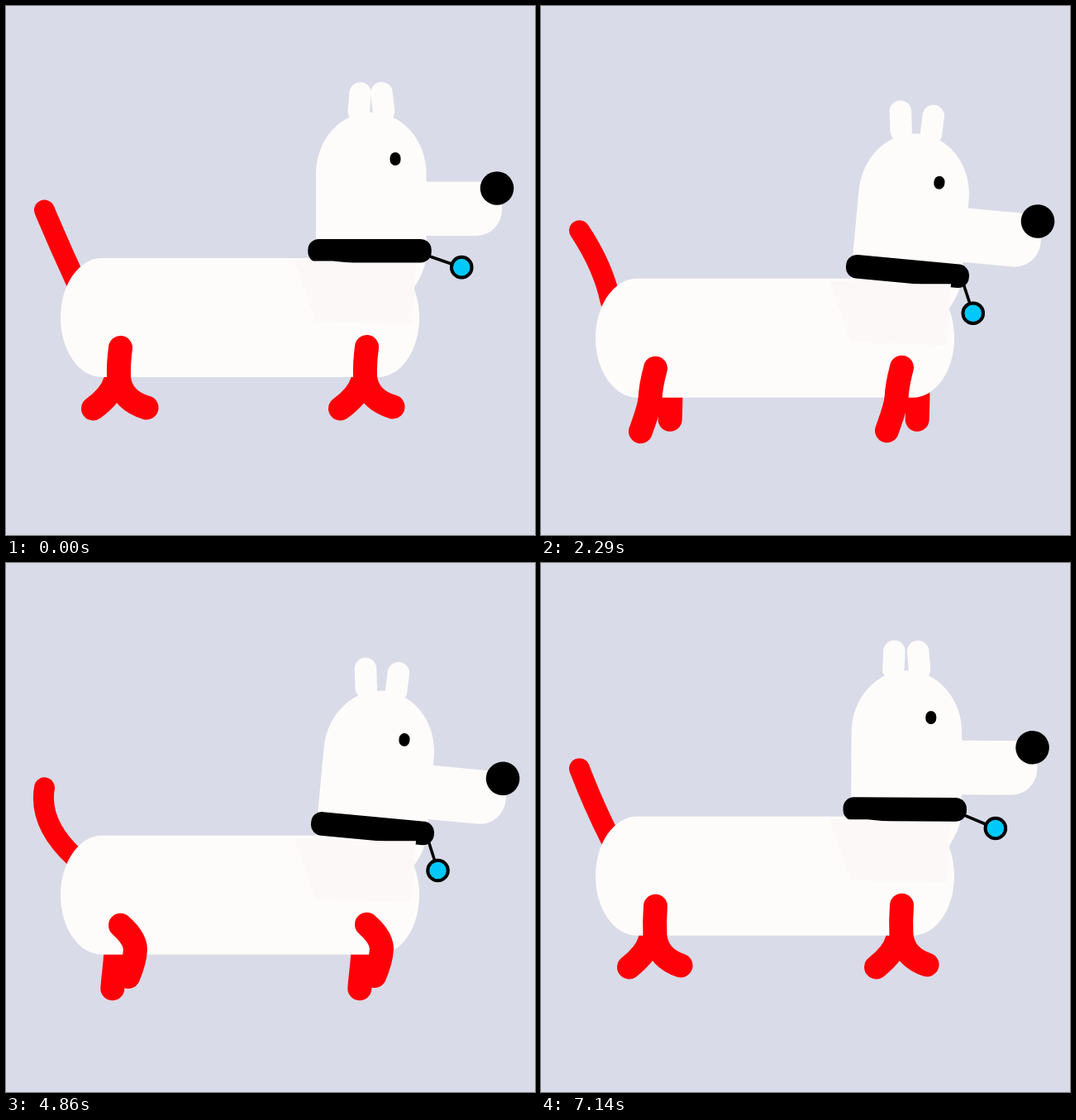
Write an HTML page that moves like this. It is 640 by 640 pixels and loops after 7.21 s.

```html
<!DOCTYPE html>
<html lang="en">
<head>
<meta charset="utf-8">
<title>Walking dog</title>
<style>
  html, body { margin: 0; width: 100%; height: 100%; overflow: hidden; background: #d9dbe8; }
  svg { display: block; width: 100%; height: 100%; }
  .white { fill: #fdfcfa; }
  .limb { fill: none; stroke: #ff0008; stroke-width: 29; stroke-linecap: round; stroke-linejoin: round; }
  .ear { stroke: #fdfcfa; stroke-width: 26.5; stroke-linecap: round; }
</style>
</head>
<body>
<svg viewBox="0 0 640 640">
  <g id="dog">
    <path id="tail" class="limb" style="stroke-width:25"/>
    <path class="limb far"/>
    <path class="limb far" transform="translate(299 0)"/>
    <g id="head">
      <line id="earL" class="ear"/>
      <line id="earR" class="ear"/>
      <path class="white" d="M375 320V203A66.75 74.5 0 0 1 508.5 203V305Q506 322 493 342L485 352H400Z"/>
      <path class="white" d="M490 212.5H600V246A31 32 0 0 1 569 278H490Z"/>
      <circle cx="594" cy="220.5" r="20.3"/>
      <rect id="eye" x="464.5" y="177" width="13" height="16" rx="6.5" ry="7"/>
    </g>
    <rect class="white" x="66" y="305" width="434" height="144" rx="50" ry="72"/>
    <g id="tag" stroke="#000">
      <line id="string" stroke-width="3.6"/>
      <circle id="bead" r="12.3" fill="#00c8fa" stroke-width="4"/>
    </g>
    <rect id="collar" x="365.3" y="282" width="149.4" height="28.6" rx="13"/>
    <path fill="#fcf8f7" d="M349 308.5H395L425 311.5H496L493.5 342L494 360L489 385.5L375 382Z"/>
    <path class="limb near"/>
    <path class="limb near" transform="translate(298 -1)"/>
  </g>
</svg>
<script>
const LOOP = 7210, STEPS = 101, STRIDE = 1791.7;
const LOW = 0.48;                       // point in a bounce where the body is lowest
const KEYS = [0, 0.24, 0.5, 0.74, 1];   // stride phases of the poses below

// Two cubic segments from the hip: controls, knee, controls, foot.
const LEG = [
  [137, 425, 136, 436, 136.5, 449, 138, 470, 153, 481, 170, 486],
  [135, 425, 132, 438, 132, 450, 131, 463, 126, 477, 122.8, 490.5],
  [137.5, 427, 136, 440, 132.5, 453, 129, 466, 118, 478, 105.5, 487],
  [148, 420, 159, 429, 160, 441, 160, 452, 157, 464, 154, 474]
];
const TAIL = [[65], [72], [59.5], [51]];

const $ = id => document.getElementById(id);
const mix = (a, b, k) => a + (b - a) * k;
const set = (el, attrs) => { for (const k in attrs) el.setAttribute(k, attrs[k]); };

function pose(keys, phase) {
  const p = phase % 1;
  const i = KEYS.findIndex((k, n) => p >= k && p < KEYS[n + 1]);
  const k = (p - KEYS[i]) / (KEYS[i + 1] - KEYS[i]);
  return keys[i].map((v, n) => mix(v, keys[(i + 1) % 4][n], k));
}

function drawLegs(selector, phase) {
  const d = 'M138.5 413.5C' + pose(LEG, phase).join(' ');
  document.querySelectorAll(selector).forEach(leg => set(leg, { d }));
}

function draw(t) {
  const phase = t / STRIDE;
  const bounce = phase * 2 % 1;
  const drop = bounce < LOW ? bounce / LOW : (1 - bounce) / (1 - LOW);
  const tilt = 6.2 * drop;

  set($('dog'), { transform: `translate(0 ${28.5 * drop})` });
  set($('head'), { transform: `rotate(${tilt} 434 303)` });
  set($('collar'), { transform: `rotate(${tilt} 441 333)` });

  drawLegs('.near', phase);
  drawLegs('.far', phase + 0.5);

  const [bend] = pose(TAIL, phase);
  set($('tail'), { d: `M46.5 247Q${2 * bend - 65.25} 290.5 84 332` });

  const flop = drop ** 0.6;
  set($('earL'), { x1: mix(428.7, 415, flop), y1: mix(105.5, 103.5, flop), x2: mix(426.7, 418.5, flop), y2: 127 });
  set($('earR'), { x1: mix(454.5, 456.5, flop), y1: 105.2, x2: mix(457, 455.6, flop), y2: 127 });

  // One short glance forward near the end of the walk
  const glance = Math.max(0, Math.min(1, (t - 5600) / 300, (6900 - t) / 300));
  set($('eye'), { transform: `translate(${4.5 * glance} 0)` });

  const angle = (19 + 61 * drop) * Math.PI / 180, reach = 42 - 7 * drop;
  const x = 511.5, y = 302.5 + 12 * drop;
  const bx = x + reach * Math.cos(angle), by = y + reach * Math.sin(angle);
  set($('string'), { x1: x, y1: y, x2: bx, y2: by });
  set($('bead'), { cx: bx, cy: by });
}

const start = performance.now();
function tick(now) {
  const step = LOOP / STEPS;
  const t = Math.max(0, now - start) % LOOP;
  draw(Math.min(STEPS - 1, Math.floor((t + 2) / step)) * step);
  requestAnimationFrame(tick);
}
draw(0);
requestAnimationFrame(tick);
</script>
</body>
</html>
```
